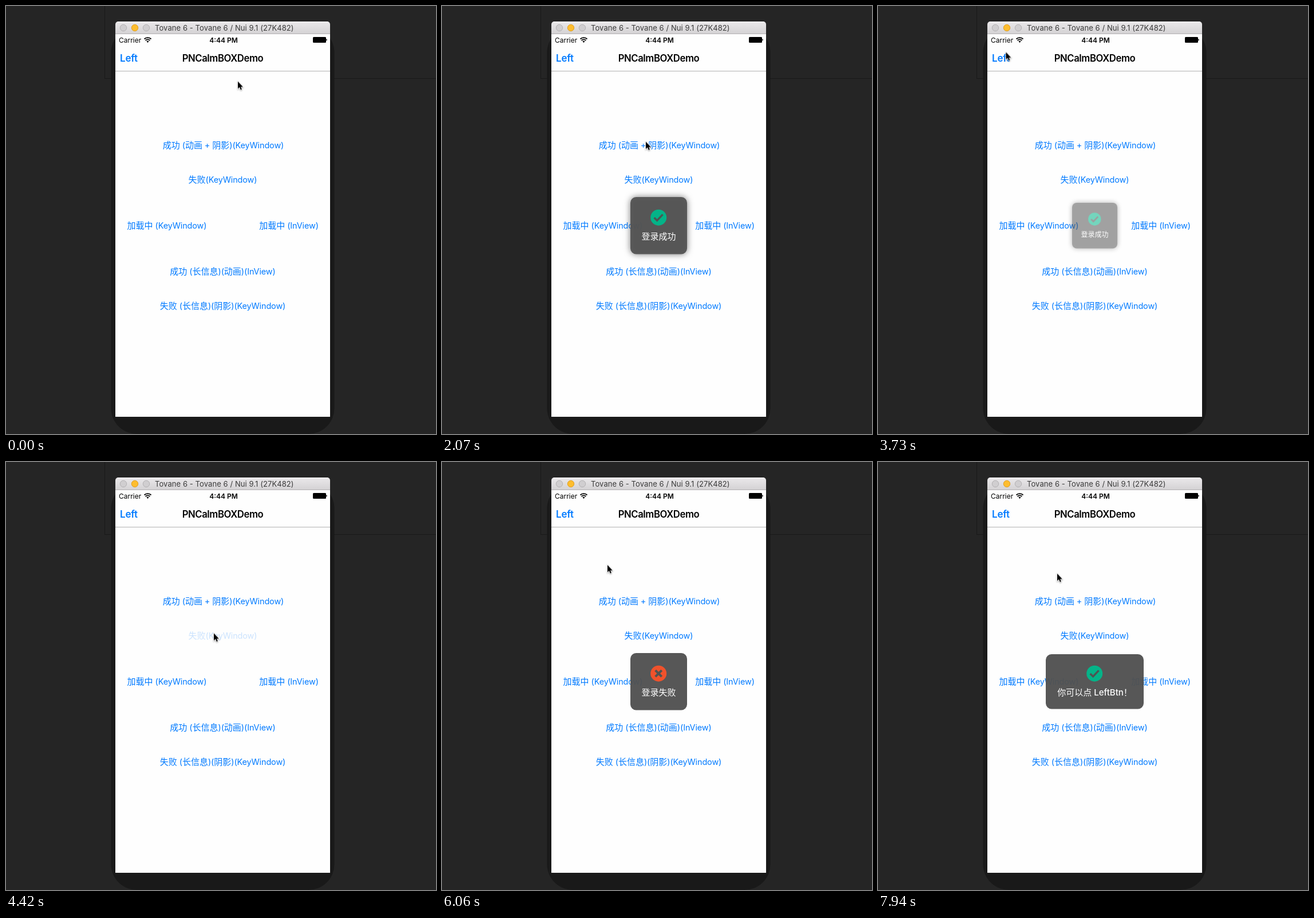
An HTML page that plays this animation: 751x746 px, repeating every 8000 ms.

```html
<!DOCTYPE html>
<html lang="zh-CN">
<head>
<meta charset="utf-8">
<title>HUD demo</title>
<style>
html, body { margin: 0; width: 100%; height: 100%; overflow: hidden; background: #252525; }
svg { display: block; width: 751px; height: 746px; }
text { font: 15px Inter, "Noto Sans CJK SC", "Noto Sans CJK", sans-serif; }
.mid text, .mid { text-anchor: middle; }
.links { fill: #007aff; }
.links .latin { font-size: 14.4px; letter-spacing: -.1px; }
.nav { font-size: 17px; font-weight: 600; letter-spacing: -.2px; }
.nav.mid { font-size: 16.7px; letter-spacing: -.4px; }
.hud text { fill: #fff; font-weight: 500; }
.hud .box { fill: #515151; fill-opacity: .96; }
.mark { fill: none; stroke: #4e5452; }

.hud, .press, #cursor { animation: 8s linear infinite; }
.hud { opacity: 0; transform-origin: 378.5px 382.5px; }
#glow .box { fill: #555; filter: drop-shadow(0 0 6px rgba(0, 0, 0, .55)); }
#glow { animation-name: glow; }
#fail { animation-name: fail; }
#long { animation-name: long; }
#press1 { animation-name: press1; }
#press2 { animation-name: press2; }
#press3 { animation-name: press3; }
#cursor { animation-name: cursor; }

@keyframes glow {
  0%, 22% { opacity: 0; transform: scale(.55); animation-timing-function: ease-out; }
  25.75%, 45.25% { opacity: 1; transform: none; }
  48.375%, 100% { opacity: 0; transform: scale(.55); }
}
@keyframes fail {
  0%, 55.375% { opacity: 0; animation-timing-function: ease-out; }
  58.625%, 82.5% { opacity: 1; }
  85.625%, 100% { opacity: 0; }
}
@keyframes long {
  0%, 95% { opacity: 0; transform: scale(.55); animation-timing-function: ease-out; }
  98.75%, 100% { opacity: 1; transform: none; }
}
@keyframes press1 {
  0%, 17.5%, 24.5%, 100% { opacity: 1; }
  18.5%, 21% { opacity: .2; }
}
@keyframes press2 {
  0%, 51.625%, 58%, 100% { opacity: 1; }
  53%, 55.25% { opacity: .2; }
}
@keyframes press3 {
  0%, 92.625%, 97.5%, 100% { opacity: 1; }
  93.625%, 94.5% { opacity: .2; }
}
@keyframes cursor {
  0%, 10.5% { transform: translate(405px, 131.5px); animation-timing-function: ease-in-out; }
  17.5%, 41.5% { transform: translate(356px, 236.5px); animation-timing-function: ease-in-out; }
  46.25%, 47% { transform: translate(223.5px, 80.5px); animation-timing-function: ease-in-out; }
  50.875%, 51.625% { transform: translate(363px, 292px); }
  53%, 59% { transform: translate(363px, 298.5px); animation-timing-function: ease-in-out; }
  65.25%, 72.75% { transform: translate(209px, 88px); animation-timing-function: ease-in-out; }
  75.75%, 82.5% { transform: translate(289px, 179.5px); animation-timing-function: ease-in-out; }
  88.25% { transform: translate(375.5px, 447.5px); animation-timing-function: ease-out; }
  91.125%, 95.5% { transform: translate(375.5px, 456px); animation-timing-function: ease-in-out; }
  99.25%, 100% { transform: translate(313px, 194.5px); }
}
</style>
</head>
<body>
<svg viewBox="0 0 751 746">
  <defs>
    <linearGradient id="bar" x2="0" y2="1">
      <stop stop-color="#ebe9eb"/><stop offset="1" stop-color="#d3d1d3"/>
    </linearGradient>
    <path id="tick" class="mark" d="M370.6 369l5 4.8 9.9-10.4" stroke-width="3.3"/>
  </defs>

  <!-- desktop and device -->
  <path d="M172.5 0V126.5H751" fill="none" stroke="#191919"/>
  <rect x="183.5" y="36" width="390" height="710" rx="45" fill="#191919"/>
  <rect x="191" y="48" width="375" height="668" fill="#fefefe"/>

  <!-- window bar -->
  <path d="M191 49V32a5 5 0 0 1 5-5H561a5 5 0 0 1 5 5V49z" fill="url(#bar)"/>
  <path d="M195 27.5H562" stroke="#f6f5f6"/>
  <path d="M191 48.5H566" stroke="#b3b1b3"/>
  <g fill="#d0ced0" stroke="#b4b2b4">
    <circle cx="205" cy="38" r="5.7"/>
    <circle cx="225" cy="38" r="5.7" fill="#fdbd2e" stroke="#dfa023"/>
    <circle cx="245" cy="38" r="5.7"/>
  </g>
  <text x="260" y="43" fill="#3a3a3a" style="font-size:13px;letter-spacing:.08px">Tovane 6 - Tovane 6 / Nui 9.1 (27K482)</text>

  <!-- status bar -->
  <text x="197" y="63.5" style="font-size:12px">Carrier</text>
  <g fill="none" stroke="#000" stroke-width="1.8">
    <path d="M241.5 57.5a8.6 8.6 0 0 1 12 0M243.6 60a5.6 5.6 0 0 1 7.8 0"/>
    <path d="M247.5 64l-2.1-2.4a3.2 3.2 0 0 1 4.2 0z" fill="#000" stroke="none"/>
  </g>
  <text class="mid" x="380" y="63.5" style="font-size:12px;font-weight:600">4:44 PM</text>
  <rect x="536" y="54" width="23" height="10" rx="1.5"/>
  <path d="M559.3 57.5q1.6.2 1.6 1.5t-1.6 1.5z"/>

  <!-- navigation bar -->
  <text class="nav" x="199" y="97" fill="#007aff">Left</text>
  <text class="nav mid" x="378.5" y="97">PNCalmBOXDemo</text>
  <path d="M191 113.5H566" stroke="#b2b2b2"/>

  <g class="links mid">
    <text class="mix press" id="press1" x="379.5" y="248.3">成功 (动画 + 阴影)(KeyWindow)</text>
    <text class="mix press" id="press2" x="378.5" y="308.3">失败(KeyWindow)</text>
    <text class="mix" x="281" y="388.3">加载中 (KeyWindow)</text>
    <text class="mix" x="494" y="388.3">加载中 (InView)</text>
    <text class="mix press" id="press3" x="378.5" y="468.3">成功 (长信息)(动画)(InView)</text>
    <text class="mix" x="378.5" y="528.3">失败 (长信息)(阴影)(KeyWindow)</text>
  </g>

  <g class="hud mid" id="glow">
    <rect class="box" x="329" y="333" width="99" height="99.5" rx="10"/>
    <circle cx="378.2" cy="368.7" r="14" fill="#04b388"/>
    <use href="#tick"/>
    <text x="378.5" y="407">登录成功</text>
  </g>
  <g class="hud mid" id="fail">
    <rect class="box" x="329" y="333" width="99" height="99.5" rx="10"/>
    <circle cx="378.2" cy="368.7" r="14" fill="#ef522c"/>
    <path class="mark" d="M372.7 363.2l11 11m0-11l-11 11" stroke-width="4"/>
    <text x="378.5" y="407">登录失败</text>
  </g>
  <g class="hud mid" id="long">
    <rect class="box" x="293" y="335" width="171" height="95.5" rx="10"/>
    <circle cx="378.2" cy="368.7" r="14" fill="#04b388"/>
    <use href="#tick"/>
    <text x="378.5" y="407">你可以点 LeftBtn！</text>
  </g>

  <g id="cursor">
    <path d="M0 0V12.8L2.9 10.1 4.9 14.7 6.9 13.8 5 9.5H8.9z" stroke="#fff" stroke-width="1.6"
      paint-order="stroke" style="filter:drop-shadow(0 1px 1px rgba(0,0,0,.35))"/>
  </g>
</svg>
<script>
// Latin runs are set slightly smaller than the Chinese around them.
for (const t of document.querySelectorAll('.mix'))
  t.innerHTML = t.textContent.replace(/[ -~]+/g, '<tspan class="latin">$&</tspan>');
</script>
</body>
</html>
```
